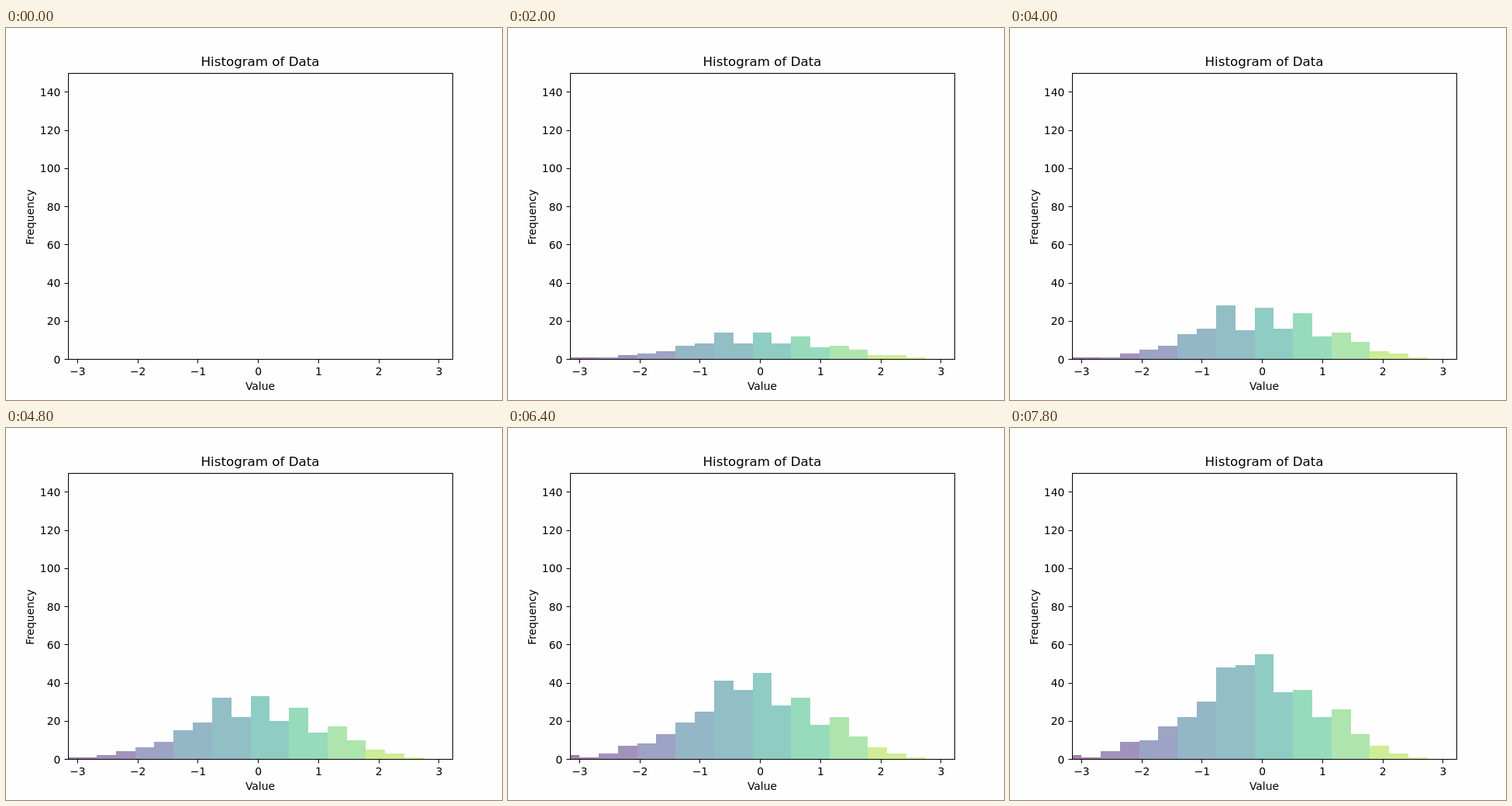
An HTML page that plays this animation: 640 px wide and 480 px high, repeating every 8000 ms.

```html
<!DOCTYPE html>
<html lang="en">
<head>
<meta charset="utf-8">
<title>Histogram of Data</title>
<style>
  html, body { margin: 0; width: 100%; height: 100%; overflow: hidden; background: #fefefe; }
  svg { display: block; width: 640px; height: 480px; }
  text { font: 13.89px "DejaVu Sans", sans-serif; fill: #000; text-anchor: middle; }
  .title { font-size: 16.67px; }
  .y-tick { text-anchor: end; }
  .axes { fill: none; stroke: #000; stroke-width: 1; }
  #bars { shape-rendering: crispEdges; }
</style>
</head>
<body>
<svg viewBox="0 0 640 480">
  <clipPath id="plot"><rect x="80" y="58" width="496" height="370"/></clipPath>
  <g id="bars" clip-path="url(#plot)"></g>
  <g id="ticks"></g>
  <rect class="axes" x="80.5" y="58.5" width="496" height="369"/>
  <text class="title" x="328" y="49">Histogram of Data</text>
  <text x="328" y="467">Value</text>
  <text transform="translate(36 244) rotate(-90)">Frequency</text>
</svg>
<script>
const STEP_MS = 200, STEPS = 40;
const SVG_NS = 'http://www.w3.org/2000/svg';

// Bin counts halfway and at the end; growth is linear on either side of KNEE.
const KNEE = 20, LAST = STEPS - 1;
const midCounts = [1, 1, 1, 3, 5, 7, 13, 16, 28, 15, 27, 16, 24, 12, 14, 9, 4, 3, 1];
const endCounts = [2, 1, 4, 9, 10, 17, 22, 30, 48, 49, 55, 35, 36, 22, 26, 13, 7, 3, 1];

// Neighbouring bins share a colour in pairs.
const palette = [
  '#a180a9', '#a192ba', '#9da3c4', '#95b6c7', '#92bec5',
  '#8fccc3', '#97dabc', '#aee4ad', '#cfec97', '#dbf096'
];

const binEdge = i => Math.round(67.3 + 24.82 * i);
const xOf = value => 325.2 + 77.75 * value;
const yOf = count => 427.2 - 2.464 * count;

function add(parent, tag, attrs, text = '') {
  const node = document.createElementNS(SVG_NS, tag);
  for (const name in attrs) node.setAttribute(name, attrs[name]);
  node.textContent = text;
  return parent.appendChild(node);
}

const ticks = document.getElementById('ticks');
for (let v = -3; v <= 3; v++) {
  const x = xOf(v);
  add(ticks, 'path', { class: 'axes', d: `M${Math.round(x) + 0.5} 428v4.5` });
  add(ticks, 'text', { x: x + 0.5, y: 448 }, String(v).replace('-', '\u2212'));
}
for (let v = 0; v <= 140; v += 20) {
  const y = yOf(v);
  add(ticks, 'path', { class: 'axes', d: `M75.5 ${Math.round(y) + 0.5}h5` });
  add(ticks, 'text', { class: 'y-tick', x: 70.3, y: Math.round(y + 5.5) }, v);
}

const barGroup = document.getElementById('bars');
const bars = endCounts.map((_, i) => {
  const x = binEdge(i);
  return add(barGroup, 'rect', { x, width: binEdge(i + 1) - x, fill: palette[i >> 1] });
});

function countAt(bin, step) {
  const mid = midCounts[bin], end = endCounts[bin];
  return Math.round(step < KNEE
    ? mid * step / KNEE
    : mid + (end - mid) * (step - KNEE) / (LAST - KNEE));
}

function draw(step) {
  bars.forEach((bar, bin) => {
    const y = Math.round(yOf(countAt(bin, step)));
    bar.setAttribute('y', y);
    bar.setAttribute('height', 427 - y);
  });
}

let start, shown = -1;
function tick(now) {
  start ??= now;
  const step = Math.floor((now - start) / STEP_MS) % STEPS;
  if (step !== shown) draw(shown = step);
  requestAnimationFrame(tick);
}
draw(0);
requestAnimationFrame(tick);
</script>
</body>
</html>
```
